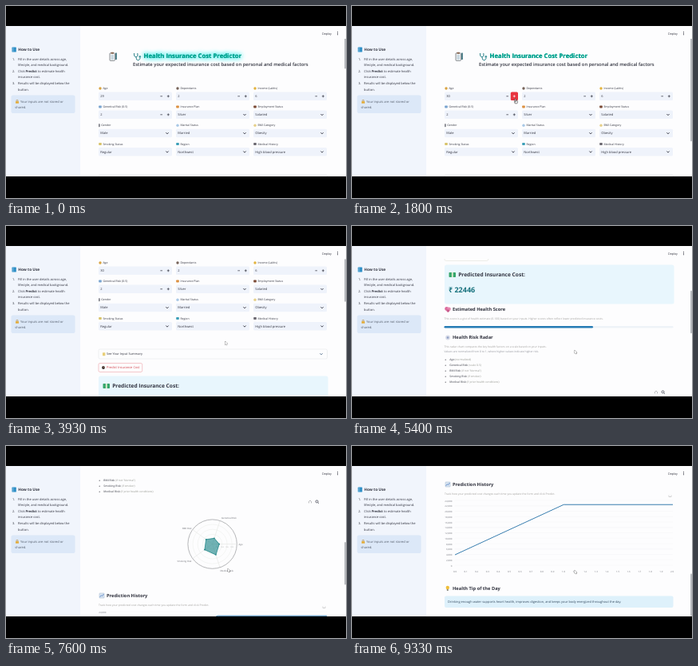
Animation, 426 px wide and 240 px high, one loop 9.39 s. Source, as an HTML page with a canvas:

```html
<!DOCTYPE html>
<html lang="en">
<head>
<meta charset="utf-8">
<title>Health Insurance Cost Predictor</title>
<style>
html, body { margin: 0; width: 100%; height: 100%; overflow: hidden; background: #000; }
canvas { display: block; width: 426px; height: 240px; }
</style>
</head>
<body>
<canvas id="stage" width="426" height="240"></canvas>
<script>
const ctx = document.getElementById('stage').getContext('2d');
const LOOP = 9390, STEP = 1000 / 15;
const INK = '#31333f', FAINT = '#a09f9c', PANEL = '#f1f5fc', PAGE = '#fdfdfe', RED = '#e8343f';
const TOP = 25, HEIGHT = 188, HEADER = 16, COLUMNS = [116, 213, 310];
const AGE_CLICK = 1470, PREDICT_CLICK = 3270;

// Keyframes: [time, value, ...]; movement between them is eased.
const SCROLL = [[0, 0], [2130, 0], [2530, 57], [4200, 57], [4900, 196],
  [6200, 196], [6900, 334], [8100, 334], [8800, 473]];
const POINTER = [[0, 290, 226], [500, 290, 226], [1200, 205, 118], [1900, 205, 118],
  [2750, 142, 175], [3330, 142, 175], [3800, 275.5, 146], [4200, 275.5, 146],
  [4900, 280, 157], [6200, 280, 157], [6900, 279, 155], [8100, 279, 155], [8800, 280, 157]];

const ROWS = [
  { y: 103, fields: [['Age', '', '#d9a441'], ['Dependants', '2', '#77645a'], ['Income (Lakhs)', '6', '#e3b33c']] },
  { y: 126, fields: [['Genetical Risk (0-5)', '2', '#78a3cf'], ['Insurance Plan', 'Silver', '#dc9040'], ['Employment Status', 'Salaried', '#7b4a35']] },
  { y: 149.2, fields: [['Gender', 'Male', '#4a4d58'], ['Marital Status', 'Married', '#a9c8e6'], ['BMI Category', 'Obesity', '#e6d08a']] },
  { y: 172.5, fields: [['Smoking Status', 'Regular', '#d8c36a'], ['Region', 'Northwest', '#3c9fb8'], ['Medical History', 'High blood pressure', '#6b6870']] }
];

function track(keys, t) {
  const next = keys.findIndex(k => k[0] > t);
  if (next < 0) return keys[keys.length - 1].slice(1);
  const a = keys[next - 1], b = keys[next];
  const p = (t - a[0]) / (b[0] - a[0]), e = p * p * (3 - 2 * p);
  return a.slice(1).map((v, i) => v + (b[i + 1] - v) * e);
}

function text(s, x, y, size = 4, color = INK, weight = 400, align = 'left') {
  ctx.font = `${weight} ${size}px "Open Sans", "Noto Sans", sans-serif`;
  ctx.fillStyle = color;
  ctx.textAlign = align;
  ctx.fillText(s, x, y + size * 0.34);
  return ctx.measureText(s).width;
}

function box(x, y, w, h, r, fill, stroke, width = 0.6) {
  ctx.beginPath();
  ctx.roundRect(x, y, w, h, r);
  if (fill) { ctx.fillStyle = fill; ctx.fill(); }
  if (stroke) { ctx.strokeStyle = stroke; ctx.lineWidth = width; ctx.stroke(); }
}

function disc(x, y, r, color) {
  ctx.beginPath();
  ctx.arc(x, y, r, 0, Math.PI * 2);
  ctx.fillStyle = color;
  ctx.fill();
}

function ring(x, y, r, color, width) {
  ctx.beginPath();
  ctx.arc(x, y, r, 0, Math.PI * 2);
  ctx.strokeStyle = color;
  ctx.lineWidth = width;
  ctx.stroke();
}

function line(points, color, width = 0.7, close = false) {
  ctx.beginPath();
  points.forEach(([x, y]) => ctx.lineTo(x, y));
  if (close) ctx.closePath();
  ctx.strokeStyle = color;
  ctx.lineWidth = width;
  ctx.stroke();
}

function chevron(x, y, color = INK) {
  line([[x - 1.6, y - 0.8], [x, y + 0.9], [x + 1.6, y - 0.8]], color, 0.9);
}

function clipTo(x, y, w, h) {
  ctx.save();
  ctx.beginPath();
  ctx.rect(x, y, w, h);
  ctx.clip();
}

function heading(s, y) { text(s, 126, y, 5.7, INK, 700); }

function chartIcon(x, y) {
  box(x - 3, y - 3, 6, 6, 0.5, '#dbe6f2', '#9fb4cc', 0.5);
  line([[x - 2.4, y + 1.8], [x - 0.7, y - 0.3], [x + 0.5, y + 0.7], [x + 2.4, y - 2]], '#4f7fc4', 0.8);
}

function sidebar() {
  box(0, TOP, 93, HEIGHT, 0, PANEL);
  box(7.5, 51.6, 5.3, 6, 0.6, '#2e8fc6');
  line([[9, 52], [9, 57.4]], '#a9d4ec', 0.6);
  text('How to Use', 15.3, 54.5, 4.75, INK, 700);
  text('1.', 8, 66.5); text('2.', 8, 81.6); text('3.', 8, 96.8);
  text('Fill in the user details across age,', 15, 66.5);
  text('lifestyle, and medical background.', 15, 74);
  const click = text('Click ', 15, 81.6);
  const bold = text('Predict', 15 + click, 81.6, 4, INK, 700);
  text(' to estimate health', 15 + click + bold, 81.6);
  text('insurance cost.', 15, 89);
  text('Results will be displayed below the', 15, 96.8);
  text('button.', 15, 104.2);
  box(6.5, 111.5, 80, 22.5, 2, '#dce8f8');
  box(12, 119, 4, 2.8, 0.4, '#e2ad3f');
  line([[13, 119], [13, 117.6], [15, 117.6], [15, 119]], '#b58b45', 0.6);
  text('Your inputs are not stored or', 18, 119.7, 4, '#545d6b');
  text('shared.', 11.3, 126.8, 4, '#545d6b');
}

function title(t) {
  box(130, 58.8, 6.5, 9.6, 0.8, '#f1f3f3', '#6f757c', 0.8);
  box(131.5, 57.8, 3.5, 2, 0.5, '#8b6a55');
  for (let y = 62; y < 67; y += 2) line([[131.5, y], [135, y]], '#6e98b5', 0.6);
  box(137, 58.5, 2, 8.5, 0.5, '#55858f');

  line([[160.5, 59], [160.8, 62.5], [163, 64], [165, 62.3], [164.8, 59]], '#267f87', 1);
  line([[163, 64], [163.6, 67], [166, 68], [168, 66], [167.8, 63.8]], '#267f87', 0.9);
  disc(167.8, 63.2, 1.3, '#4b9ba0');

  const glow = (1 + Math.cos(t / 1500 * Math.PI)) / 2;
  ctx.save();
  ctx.shadowColor = `rgba(0, 225, 225, ${glow})`;
  ctx.shadowBlur = 6 * glow;
  for (let i = 0; i < 2; i++) text('Health Insurance Cost Predictor', 172.5, 62.5, 7.72, '#00a08c', 700);
  ctx.restore();
  text('Estimate your expected insurance cost based on personal and medical factors', 159, 72.8, 5.86, INK, 600);
}

function form(t) {
  ROWS.forEach(({ y, fields }, row) => fields.forEach(([label, value, color], col) => {
    const x = COLUMNS[col], mid = y + 9.8;
    const numeric = row === 0 || (row === 1 && col === 0);
    const isAge = row === 0 && col === 0;
    if (label === 'Gender') box(x + 0.3, y - 2, 1.2, 4, 0.4, color);
    else if (row % 2) box(x + 0.2, y - 1.5, 3.6, 3, 0.7, color);
    else disc(x + 2, y, 1.7, color);
    text(label, x + (label === 'Gender' ? 3.2 : 5.4), y, 3.5);
    box(x, mid - 5.2, 92, 10.4, 1.5, '#eff3fb');
    text(isAge ? (t < AGE_CLICK ? '29' : '30') : value, x + 2.3, mid);
    if (!numeric) { chevron(x + 86, mid); return; }
    const hot = isAge && t > 1130 && t < PREDICT_CLICK;
    if (hot) box(x + 82.8, mid - 5.2, 9.2, 10.4, 1.5, RED);
    line([[x + 77.3, mid], [x + 80, mid]], INK, 0.7);
    const ink = hot ? '#fff' : INK;
    line([[x + 85.8, mid], [x + 88.8, mid]], ink, 0.7);
    line([[x + 87.3, mid - 1.5], [x + 87.3, mid + 1.5]], ink, 0.7);
  }));

  box(116, 211, 286.5, 12, 1.8, PAGE, '#e5e7ea');
  box(121, 215.2, 3.4, 4, 0.4, '#e8cf79');
  text('See Your Input Summary', 126, 217, 3.9);
  chevron(395, 217, '#56718f');

  const clicked = t >= PREDICT_CLICK && t < 4200;
  box(116, 228.5, 54.7, 11, 1.8, PAGE, clicked ? '#efa3a8' : '#e3e3da');
  disc(122, 234, 1.9, '#3b302e');
  disc(122.4, 233.4, 0.7, '#9a6a52');
  text('Predict Insurance Cost', 126, 234, 4, clicked ? '#d3454e' : INK);
}

function results() {
  box(116, 244.5, 287.5, 49, 2.5, '#e8f6fd');
  box(121.5, 254, 8.5, 6, 0.7, '#35a66b');
  box(124.8, 254, 2, 6, 0, '#d8e9c9');
  text('Predicted Insurance Cost:', 133.2, 256.8, 6.6, INK, 700);
  text('₹ 22446', 121, 276.2, 9, '#17717d', 700);

  disc(118.6, 299.5, 2.4, '#dc6b9d');
  disc(121.4, 299.8, 2.4, '#e587af');
  disc(120.3, 302, 1.8, '#c95b8c');
  heading('Estimated Health Score', 300);
  text('This score is a gist of health estimate (0-100) based on your inputs. Higher scores often reflect lower predicted insurance costs.', 115.5, 311.5, 3.4, FAINT);
  box(115.5, 321, 287, 2.6, 1.3, '#eef3f8');
  box(115.5, 321, 186.5, 2.6, 1.3, '#267cb5');

  disc(120, 335.5, 2.9, '#d8dce9');
  disc(120, 335.5, 1.3, '#8e9ec4');
  heading('Health Risk Radar', 335.5);
  text('This radar chart compares the key health factors on a scale based on your inputs.', 115.5, 346.5, 3.4, FAINT);
  text('Values are normalized from 0 to 1, where higher values indicate higher risk.', 115.5, 352.7, 3.4, '#92949c');
  const items = [['Age', ' (normalized)'], ['Genetical Risk', ' (scale 0-5)'], ['BMI Risk', " (if not 'Normal')"],
    ['Smoking Risk', ' (if smoker)'], ['Medical Risk', ' (if prior health conditions)']];
  items.forEach(([name, note], i) => {
    const y = 363.3 + i * 7;
    disc(117.2, y, 0.7, '#6f7178');
    const w = text(name, 122.3, y, 3.4, '#62646c', 600);
    text(note, 122.3 + w, y, 3.4, '#94968f');
  });
}

function radar() {
  const cx = 258.6, cy = 456.6, radius = 30.7;
  const at = (i, v) => {
    const a = -i * Math.PI * 2 / 5;
    return [cx + Math.cos(a) * v * radius, cy + Math.sin(a) * v * radius];
  };
  line([[379.5, 405.4], [379.5, 403.5], [381, 402], [382.5, 403.5], [382.5, 405.4]], '#999b9e', 0.7);
  ring(389.5, 403.4, 1.5, '#555762', 0.9);
  line([[390.6, 404.5], [392, 405.8]], '#555762', 0.9);

  for (let i = 1; i <= 5; i++) {
    ring(cx, cy, radius * i / 5, i < 5 ? '#ebece9' : '#97999b', i < 5 ? 0.5 : 0.7);
    line([[cx, cy], at(i, 1)], '#dfe0dd', 0.5);
    if (i < 5) text((i / 5).toFixed(1), cx + radius * i / 5, cy + 4, 2.3, '#a7a9aa', 400, 'center');
  }
  const shape = [0.28, 0.25, 0.32, 0.39, 0.46].map((v, i) => at(i, v));
  line(shape, '#2a8c8c', 0.8, true);
  ctx.fillStyle = 'rgba(20, 128, 132, 0.6)';
  ctx.fill();
  shape.forEach(([x, y]) => disc(x, y, 0.8, '#178080'));
  const labels = [['Age', 291.5, 457], ['Genetical Risk', 270, 424.5], ['BMI Risk', 221, 437.5],
    ['Smoking Risk', 214.5, 478], ['Medical Risk', 268.5, 490]];
  labels.forEach(([s, x, y]) => text(s, x, y, 2.9, '#6e7077'));
}

function history() {
  chartIcon(120, 521);
  heading('Prediction History', 521);
  text('Track how your predicted cost changes each time you update the form and click Predict.', 116, 532.8, 3.4, FAINT);
  line([[397, 534.5], [397, 536.5], [400, 536.5], [400, 534.5]], '#aaa', 0.5);
  const valueY = v => 622 - v / 24000 * 81;
  for (let v = 0; v <= 24000; v += 2000) {
    line([[129, valueY(v)], [402, valueY(v)]], '#f2f3f5', 0.5);
    text(v.toLocaleString('en-US'), 125.3, valueY(v) + 0.6, 2.9, '#75777f', 400, 'right');
  }
  for (let i = 0; i <= 20; i++) text((i / 10).toFixed(1), 129 + i * 13.6, 630, 2.9, '#75777f', 400, 'center');
  line([[129, valueY(3850)], [265.3, valueY(22446)], [402, valueY(22446)]], '#397fb0', 1);

  disc(119.8, 650, 2.2, '#f0bf3b');
  box(118.8, 652, 2, 2, 0.4, '#8d8a78');
  heading('Health Tip of the Day', 651);
  box(116, 660.5, 286.5, 14.5, 2, '#def1fb');
  text('Drinking enough water supports heart health, improves digestion, and keeps your body energized throughout the day.', 120, 667.8, 3.96, '#344a5f');
}

function pointer(t) {
  const [x, y] = track(POINTER, t);
  const hand = (t > 1150 && t < 1950) || (t > 2700 && t < 3400);
  if (hand) {
    box(x - 1.3, y, 3.7, 3.8, 1, '#fff', '#333', 0.6);
    box(x - 0.9, y - 2, 1.3, 4, 0.6, '#fff', '#333', 0.6);
    return;
  }
  line([[x - 1, y - 2], [x - 1, y + 2.3], [x, y + 1.4], [x + 0.8, y + 3], [x + 1.4, y + 2.7],
    [x + 0.8, y + 1.2], [x + 2, y + 1.1]], '#444', 0.6, true);
  ctx.fillStyle = '#fff';
  ctx.fill();
}

function scrollbar(scroll, hasResults) {
  const ratio = HEIGHT / (HEIGHT + (hasResults ? 473 : 57));
  box(424, TOP + scroll * ratio, 2, HEIGHT * ratio, 1, '#b9bbbf');
}

function draw(t) {
  const [scroll] = track(SCROLL, t);
  const hasResults = t < AGE_CLICK || t >= PREDICT_CLICK + 130;
  ctx.textRendering = 'geometricPrecision';
  box(0, 0, 426, 240, 0, '#000');
  clipTo(0, TOP, 426, HEIGHT);
  box(0, TOP, 426, HEIGHT, 0, PAGE);
  sidebar();
  text('Deploy', 396, 34.3, 3.7);
  for (let i = -1; i <= 1; i++) disc(415.5, 34.2 + i * 1.6, 0.55, INK);

  // The page header hides whatever scrolls above it, scrollbar included.
  clipTo(93, TOP + HEADER, 333, HEIGHT - HEADER);
  scrollbar(scroll, hasResults);
  ctx.translate(0, -scroll);
  title(t);
  form(t);
  if (hasResults) { results(); radar(); history(); }
  ctx.restore();

  pointer(t);
  ctx.restore();
}

const start = performance.now();
function tick() {
  const t = (performance.now() - start) % LOOP;
  draw(Math.floor(t / STEP) * STEP);
  requestAnimationFrame(tick);
}
tick();
</script>
</body>
</html>
```
